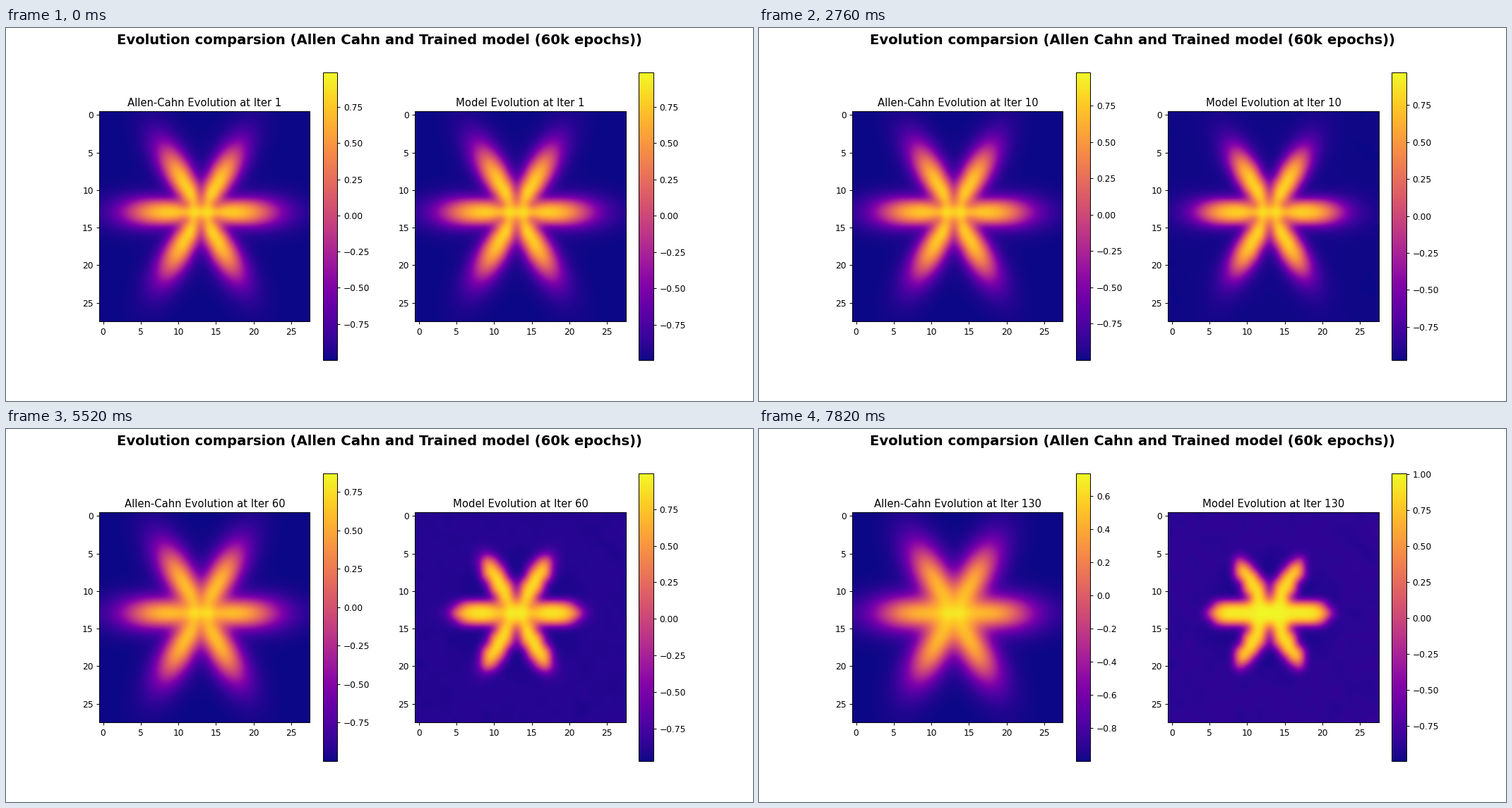
Write a matplotlib script that moves like this. It is 1058x529 px and loops after 8 s.

```python
import numpy as np
import matplotlib.pyplot as plt
from matplotlib.animation import FuncAnimation

GRID, CENTER, CELL = 28, 13, 0.05
DIFFUSION = 0.0036
LOOP, TICK, HOLD = 8000, 40, 460      # ms
ITERS = [*range(1, 6), 7, *range(10, 20, 5), *range(20, 110, 10), 130]

y, x = np.mgrid[:GRID, :GRID] - CENTER
radius = np.hypot(x, y)
star = np.tanh(1.7 + 1.2 * np.cos(6 * np.arctan2(y, x)) - 2 * np.pi * CELL * radius)
speckle = np.random.default_rng(4).normal(0, 0.12, star.shape)
haze = np.clip((radius - 3) / 7, 0, 1) + speckle


def laplacian(u):
    p = np.pad(u, 1, mode="edge")
    return p[:-2, 1:-1] + p[2:, 1:-1] + p[1:-1, :-2] + p[1:-1, 2:] - 4 * u


def evolve(reaction=0, threshold=0):
    """Fields after every iteration, by explicit Euler steps."""
    fields = [star]
    for _ in range(ITERS[-1]):
        u = fields[-1]
        growth = reaction * (u - threshold) * (1 - u * u)
        fields.append(u + DIFFUSION * laplacian(u) + growth)
    return fields


def add_haze(u, it):
    """Lift the background, then fit the field to the model's value range."""
    u = u + 0.13 * (1 - np.exp(-it / 45)) * haze * (1 - u) / 2
    low = np.interp(it, [1, 20, 130], [-0.992, -0.957, -0.992])
    high = np.interp(it, [1, 15, 80], [0.985, 0.961, 1.005])
    return low + (u - u.min()) * (high - low) / np.ptp(u)


exact = evolve()
model = evolve(reaction=0.03, threshold=0.15)

fig, axes = plt.subplots(1, 2, figsize=(12, 6), dpi=1058 / 12)
fig.suptitle("Evolution comparsion (Allen Cahn and Trained model (60k epochs))",
             y=0.984, fontsize=16, fontweight="bold")
images = [ax.imshow(star, cmap="plasma", interpolation="bicubic") for ax in axes]
for ax, im in zip(axes, images):
    fig.colorbar(im, ax=ax)


def show(panel, name, it, u):
    images[panel].set_data(u)
    images[panel].set_clim(u.min(), u.max())
    axes[panel].set_title(f"{name} Evolution at Iter {it}")


def update(frame):
    it = ITERS[(frame * TICK + TICK // 2) // HOLD]
    show(0, "Allen-Cahn", it, exact[it])
    show(1, "Model", it, add_haze(model[it], it))
    return images


anim = FuncAnimation(fig, update, frames=LOOP // TICK, interval=TICK,
                     repeat=True, repeat_delay=0)
plt.show()
```
